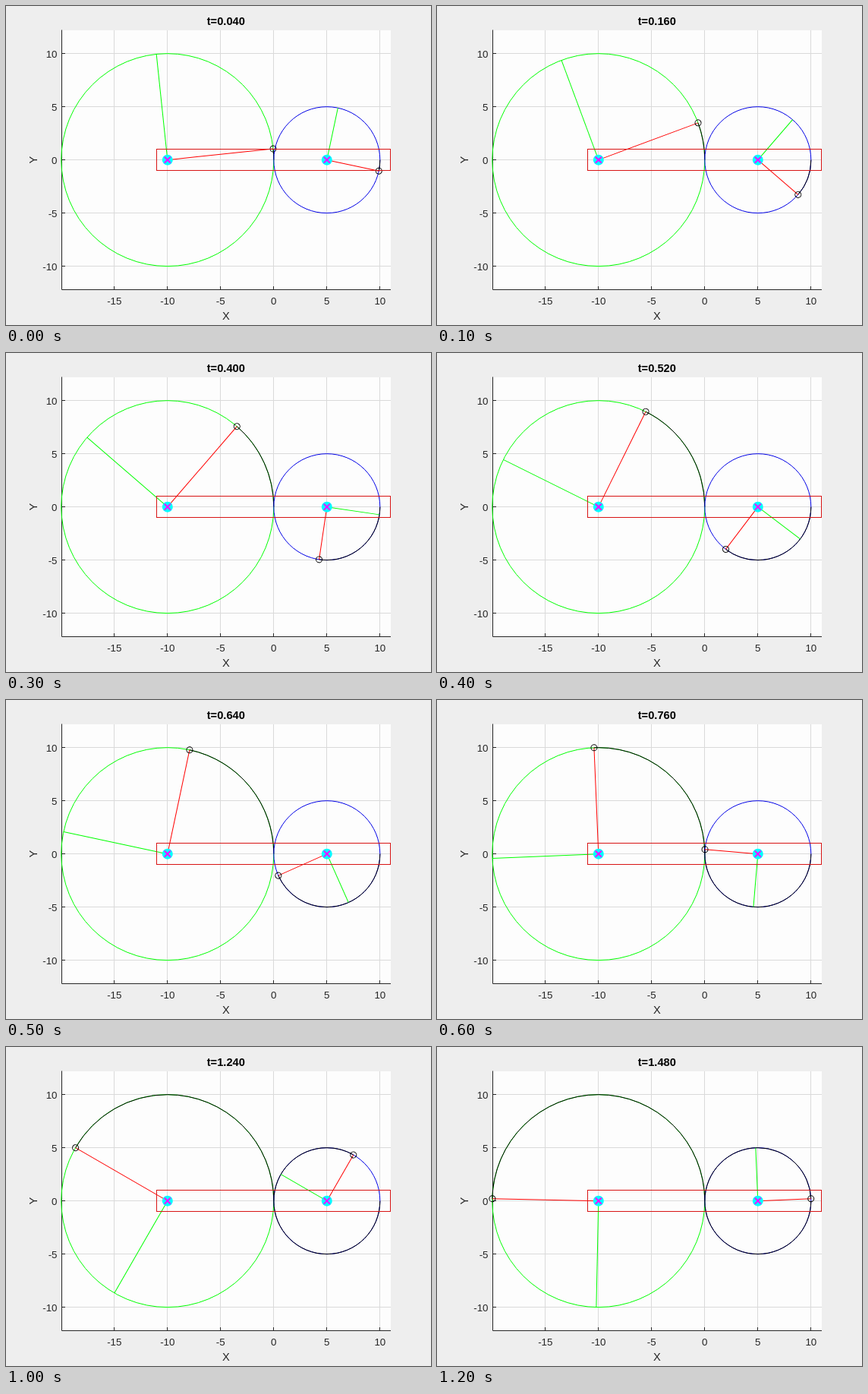
An HTML page for the animation above (1.3 s loop, 560x420 px).

```html
<!DOCTYPE html>
<html lang="en">
<head>
<meta charset="utf-8">
<title>Rolling wheels</title>
<style>
  html, body { margin: 0; width: 100%; height: 100%; overflow: hidden; background: #eee; }
  svg { display: block; }
  text { font: 13.33px "Liberation Sans", Arial, sans-serif; fill: #262626; text-anchor: middle; }
  .label { font-size: 14.67px; }
  #title { font-weight: bold; font-size: 14.67px; fill: #000; }
  #yTicks text { text-anchor: end; }
  .grid { stroke: #dadada; }
  .axis { stroke: #262626; fill: none; }
</style>
</head>
<body>
<svg width="560" height="420" viewBox="0 0 560 420">
  <rect x="73" y="32" width="434" height="342" fill="#fdfdfd"/>
  <g id="xTicks"></g>
  <g id="yTicks"></g>
  <path class="axis" d="M73.5 31.5V373.5H507"/>
  <text id="title" x="289.8" y="25"></text>
  <text class="label" x="289.8" y="413">X</text>
  <text class="label" transform="translate(41 202.6) rotate(-90)">Y</text>
  <g id="wheels" fill="none"></g>
  <rect x="198.5" y="188.5" width="308" height="28" fill="none" stroke="#d81414"/>
  <g id="hubs"></g>
</svg>
<script>
const $ = id => document.getElementById(id);
const add = (id, markup) => $(id).insertAdjacentHTML('beforeend', markup);
const UNIT = 14, X0 = 352.8, Y0 = 202.65;
const px = x => X0 + x * UNIT, py = y => Y0 - y * UNIT;
const snap = v => Math.floor(v) + 0.5;

for (let v = -15; v <= 10; v += 5) {
  const x = snap(px(v));
  add('xTicks', `<path class="grid" d="M${x} 32V373"/><path class="axis" d="M${x} 373v-4"/>
    <text x="${px(v)}" y="392.5">${v}</text>`);
  if (v < -10) continue;
  const y = snap(py(v));
  add('yTicks', `<path class="grid" d="M74 ${y}H507"/><path class="axis" d="M74 ${y}h4"/>
    <text x="67.5" y="${y + 5}">${v}</text>`);
}

// dir -1 flips the wheel so that it turns counterclockwise
function wheel(x, radius, dir, color) {
  const r = radius * UNIT;
  add('wheels', `<g transform="translate(${px(x)} ${Y0}) scale(1 ${dir})">
    <circle r="${r}" stroke="${color}"/>
    <circle r="${r}" stroke="#000" pathLength="360"/>
    <g><path d="M0 0H${r}" stroke="#f00"/>
      <path d="M0 0V${-dir * r}" stroke="#0f0"/>
      <circle cx="${r}" r="4" stroke="#000"/></g></g>`);
  add('hubs', `<g transform="translate(${px(x)} ${Y0})"><circle r="7" fill="#0ff"/>
    <path d="M-4-4L4 4M-4 4L4-4" stroke="#f0f" stroke-width="2"/></g>`);
  const [, trace, spokes] = $('wheels').lastElementChild.children;
  return angle => {
    trace.setAttribute('stroke-dasharray', `${angle} 720`);
    spokes.setAttribute('transform', `rotate(${angle})`);
  };
}

const turnBig = wheel(-10, 10, -1, '#0f0');
const turnSmall = wheel(5, 5, 1, '#0000e6');

function draw(now) {
  const t = 0.04 + 0.12 * (Math.floor(now / 100) % 13);
  const angle = 120 * (t + 0.01);
  $('title').textContent = 't=' + t.toFixed(3);
  turnBig(angle);
  turnSmall(2 * angle);
}

const start = performance.now();
function loop() {
  draw(performance.now() - start);
  requestAnimationFrame(loop);
}
loop();
</script>
</body>
</html>
```
